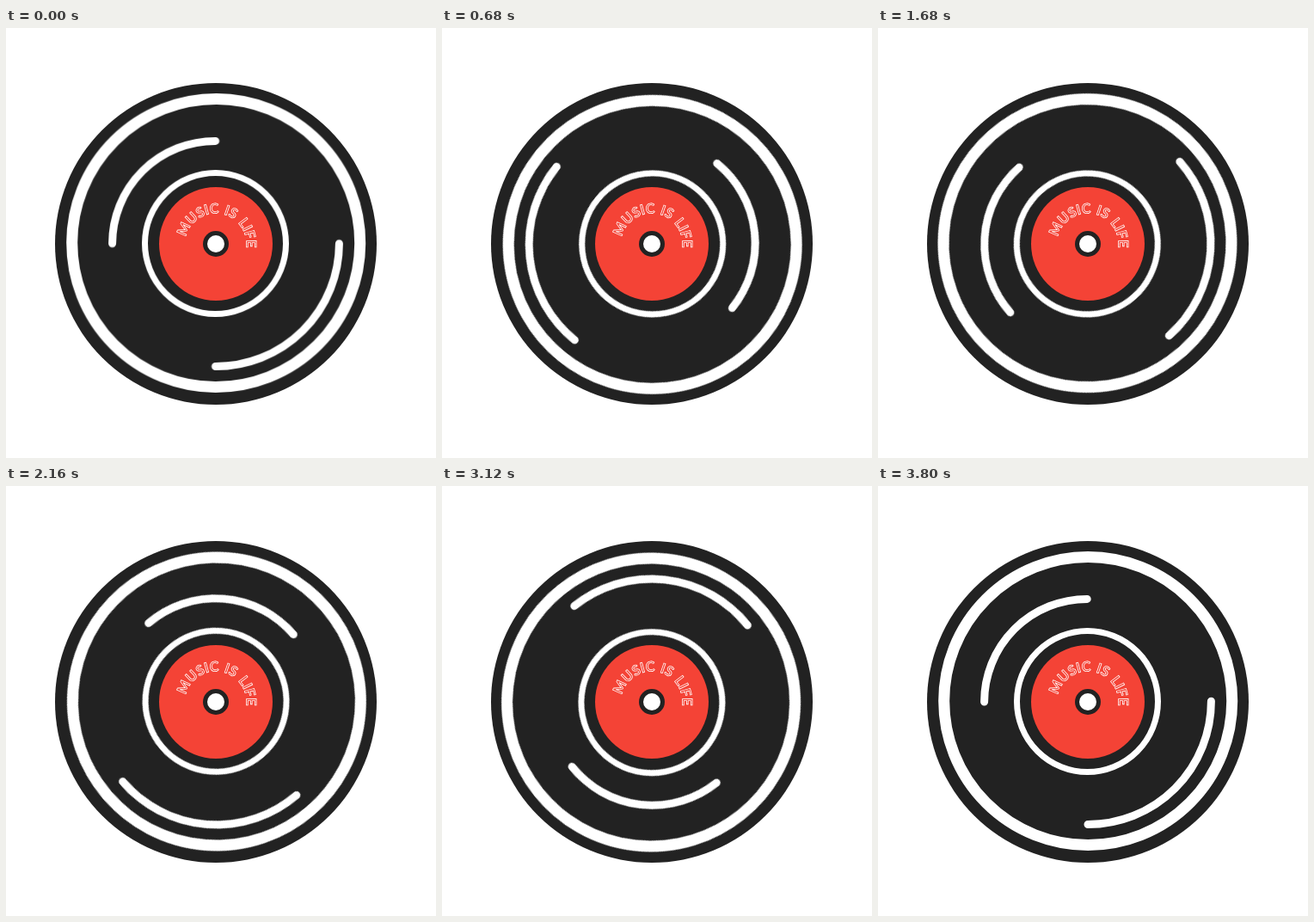
Write an HTML page without scripts that moves like this. It is 500 by 500 pixels and loops after 3.84 s.

```html
<!DOCTYPE html>
<html lang="en">
<head>
<meta charset="utf-8">
<title>Spinning record</title>
<style>
  html, body { margin: 0; width: 100%; height: 100%; overflow: hidden; background: #fff; }
  svg { display: block; width: 100vw; height: 100vh; }
  .vinyl { fill: #222; }
  .label { fill: #f44336; }
  .hole { fill: #fff; }
  .grooves {
    fill: none;
    stroke: #fff;
    stroke-linecap: round;
    transform-origin: 244px 251px;
    animation: spin 3840ms linear infinite;
  }
  .slogan {
    font: 700 16px Lato, sans-serif;
    letter-spacing: .1px;
    word-spacing: 1.5px;
    fill: #f44336;
    stroke: #fff;
    stroke-width: .8;
  }
  /* Two turns in 3800 ms, then a 40 ms rest */
  @keyframes spin {
    from { transform: rotate(0deg); }
    98.958%, to { transform: rotate(720deg); }
  }
</style>
</head>
<body>
<svg viewBox="0 0 500 500">
  <defs>
    <path id="curve" d="M209.3 243.3A35.5 35.5 0 1 1 244 286.5"/>
  </defs>
  <circle class="vinyl" cx="244" cy="251" r="187"/>
  <g class="grooves">
    <circle cx="244.2" cy="250" r="167.5" stroke-width="13"/>
    <circle cx="243.5" cy="250.5" r="82" stroke-width="7"/>
    <path d="M123.6 251A119.6 119.6 0 0 1 243.2 131.4" stroke-width="9"/>
    <path d="M387.4 250.2A143.2 143.2 0 0 1 244 393.5" stroke-width="9"/>
  </g>
  <circle class="label" cx="244" cy="251" r="66"/>
  <text class="slogan"><textPath href="#curve">MUSIC IS LIFE</textPath></text>
  <circle class="vinyl" cx="244" cy="251" r="15"/>
  <circle class="hole" cx="244" cy="251" r="10"/>
</svg>
</body>
</html>
```
